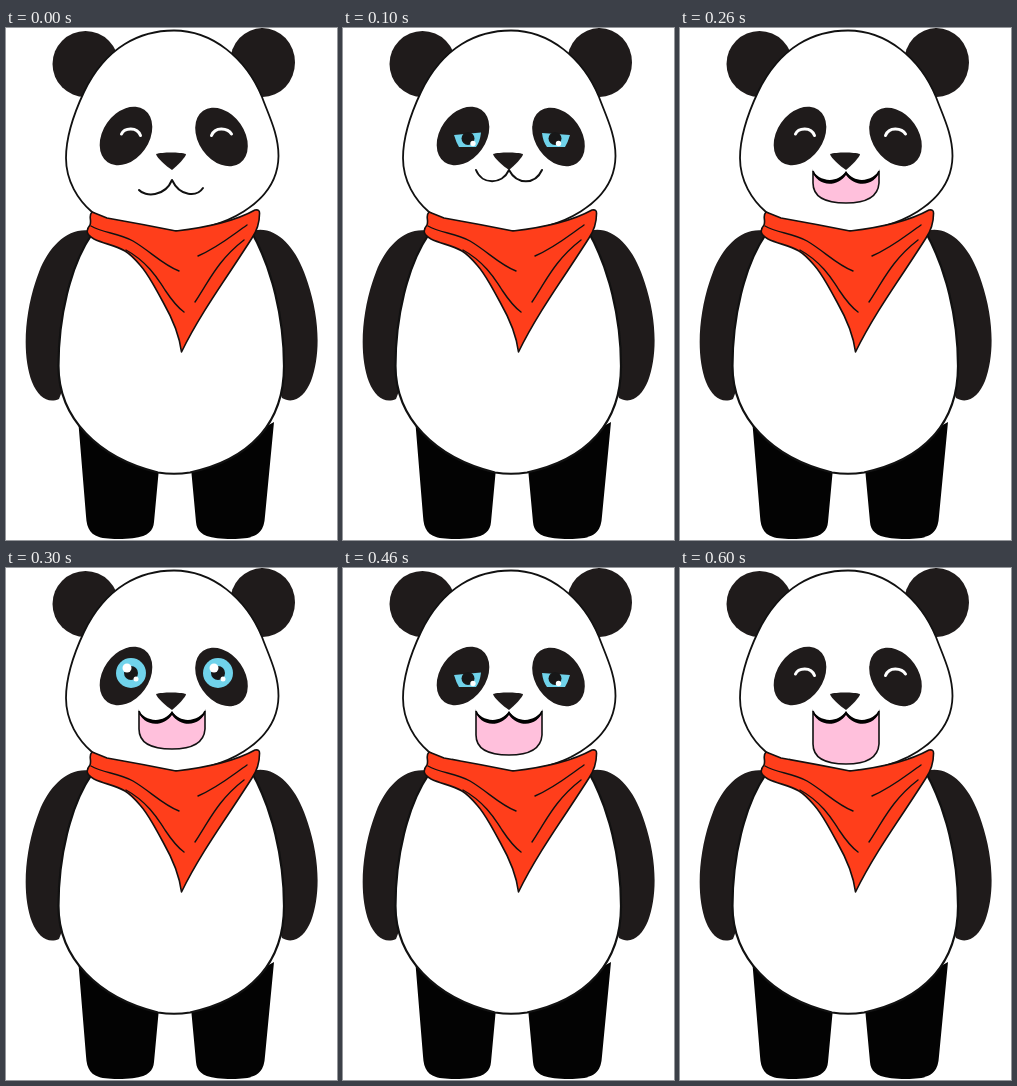
Write an HTML page that moves like this. It is 331 px wide and 512 px high and loops after 700 ms.

```html
<!DOCTYPE html>
<html lang="en">
<head>
<meta charset="utf-8">
<title>Laughing panda</title>
<style>
  html, body { margin: 0; width: 100%; height: 100%; overflow: hidden; background: #fff; }
  svg { display: block; }
  .line { fill: none; stroke: #111; stroke-linecap: round; stroke-linejoin: round; }
  .fur { fill: #1f1b1b; }
  .skin { fill: #fff; stroke: #111; }
</style>
</head>
<body>
<svg width="331" height="512" viewBox="0 0 331 512">
  <!-- legs -->
  <g fill="#030303">
    <path d="M72 390 L80 488 C81 506 88 511 112 511 C138 511 147 506 148 494 L153 440Z"/>
    <path d="M268 394 L259 488 C258 506 250 511 226 511 C200 511 191 506 190 494 L185 440Z"/>
  </g>

  <!-- arms -->
  <path class="fur" d="M90 204 C66 196 44 215 33 244 C19 280 15 325 26 354 C32 369 42 376 53 371 L80 300Z"/>
  <path class="fur" d="M243 204 C266 195 287 215 298 244 C313 283 316 323 305 353 C299 368 288 377 276 370 L250 300Z"/>

  <!-- body -->
  <path class="skin" stroke-width="2.2"
        d="M86 206 C64 238 52.500 290 52.500 338 C52.500 390 92 430 152 444.500 Q168 447 184 444.500 C243 432 278 396 278 338 C278 290 266 240 245 203Z"/>

  <!-- head -->
  <circle class="fur" cx="79.500" cy="36" r="33"/>
  <ellipse class="fur" cx="256.500" cy="34.500" rx="32.500" ry="34.500"/>
  <path class="skin" stroke-width="1.8"
        d="M168 2.500 C135 2.500 100 18 78 64 C70 81 60 106 60 130 C60 153 72 172 86 184 C105 198 135 203 168 203 C215 203 272 176 272.500 128 C272.500 106 263 88 256 69 C240 30 206 2.500 168 2.500Z"/>
  <ellipse class="fur" cx="120" cy="108" rx="23" ry="32" transform="rotate(35 120 108)"/>
  <ellipse class="fur" cx="215.500" cy="109" rx="23" ry="32" transform="rotate(-35 215.500 109)"/>
  <path class="fur" d="M150 126 C156 124 174 124 180 126 C180 129 171 138 166 142 C160 138 151 130 150 126Z"/>

  <!-- scarf -->
  <path d="M86 184 C91 186 96 188 101 190 Q135 196 170 203 Q222 197 249 182 Q254 181 253.500 186 C253.500 197 250 204 246 210 C222 248 195 284 175.500 324 C173 304 165 288 157 274 C148 258 143 247 134 237 C128 230 124 226 119 223 C109 217 98 216 88 211 C81 207 79 203 84 197 C86 192 82 188 86 184Z"
        fill="#ff3e1b" stroke="#16100f" stroke-width="1.6" stroke-linejoin="round"/>
  <g class="line" stroke-width="1.4">
    <path d="M85 198 C97 205 113 205 127 213 C144 223 157 237 173 243"/>
    <path d="M120 222 C140 233 151 249 159 262 C165 271 171 279 178 284"/>
    <path d="M241 197 C224 209 211 220 192 228"/>
    <path d="M238 212 C212 232 203 253 189 274"/>
  </g>

  <!-- eyes -->
  <g id="closed" class="line" style="stroke:#fff" stroke-width="3">
    <path d="M115.500 106 C118 100 131 98 134.500 107.500"/>
    <path d="M205.500 107.500 C209 98 222 100 225.500 106"/>
  </g>
  <g id="half">
    <path d="M111 107 L138 104.500 Q137 114 133 119 H116 Q113 114 111 107Z M227 107 L199 105 Q200 114 204 119 H222 Q225 114 227 107Z" fill="#70d3eb"/>
    <circle cx="125" cy="110.500" r="6.500" fill="#171718"/>
    <circle cx="212" cy="110.500" r="6.500" fill="#171718"/>
    <circle cx="130" cy="115.500" r="2.700" fill="#fff"/>
    <circle cx="215.500" cy="115.500" r="2.700" fill="#fff"/>
  </g>
  <g id="open">
    <g id="iris">
      <circle cx="125" cy="105" r="15" fill="#70d3eb"/>
      <circle cx="125" cy="105" r="7" fill="#171718"/>
      <circle cx="121" cy="100" r="4.500" fill="#fff"/>
      <circle cx="130" cy="111" r="2.500" fill="#fff"/>
    </g>
    <use href="#iris" x="87"/>
  </g>

  <path id="smile" class="line" stroke-width="2"/>
  <g id="laugh">
    <path id="cavity" fill="#ffc0dc" stroke="#111" stroke-width="1.6"/>
    <path d="M132 141 C137 153 157 157 166 143 C175 157 194 153 200 141 C196 159 175 160 166 147 C157 160 136 159 132 141Z"/>
  </g>
</svg>
<script>
  const get = id => document.getElementById(id);
  const show = (id, on) => { get(id).style.display = on ? "" : "none"; };

  // One pose per step: eyes, and the lowest point of an open mouth.
  const poses = [
    ["closed"], ["half"], ["closed", 175], ["open", 181],
    ["half", 187], ["closed", 192], ["closed", 196]
  ];
  const step = 100;

  const smile = "M133 162 C139 169 159 169 166 152 C174 169 191 169 197 160";
  const grin = "M133 142 C139 157 159 157 166 142 C174 157 192 157 199 142";

  const cavity = low =>
    `M133 143 C137 156 157 158 166 145 C175 158 195 156 199 143 L199 ${low - 20} ` +
    `C198 ${low - 5} 184 ${low} 166 ${low} C148 ${low} 133 ${low - 5} 133 ${low - 20}Z`;

  function draw() {
    const i = Math.floor(performance.now() / step) % poses.length;
    const [look, low] = poses[i];
    for (const id of ["closed", "half", "open"]) show(id, id === look);
    show("smile", !low);
    show("laugh", low);
    if (low) get("cavity").setAttribute("d", cavity(low));
    else get("smile").setAttribute("d", i ? grin : smile);
    requestAnimationFrame(draw);
  }
  draw();
</script>
</body>
</html>
```
